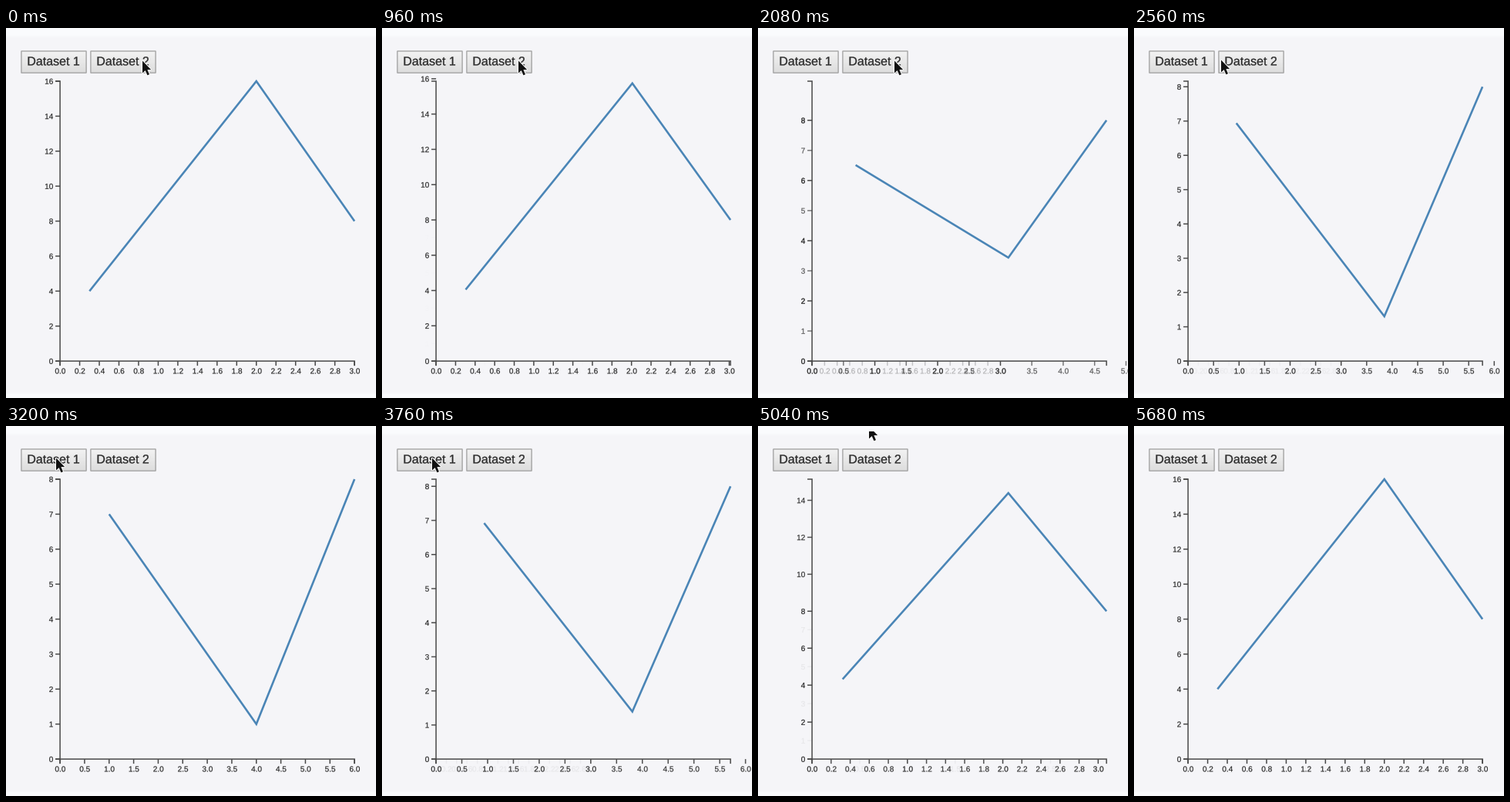
These frames come from a looping animation (480 by 480 pixels, 6.08 s). A matplotlib script:

```python
import numpy as np
import matplotlib.pyplot as plt
from matplotlib.animation import FuncAnimation
from matplotlib.patches import PathPatch, Polygon, Rectangle
from matplotlib.textpath import TextPath
from matplotlib.transforms import Affine2D

SIZE, STEP, LOOP = 480, 80, 6080
LEFT, RIGHT, TOP, BOTTOM = 70.1, 452.1, 69, 432.1
INK = "#2a2a2a"
RULE = dict(color="#484848", lw=1.5, zorder=2, solid_capstyle="butt",
            solid_joinstyle="miter", snap=False)

# Each dataset: points, axis maxima and tick steps
DATA = [
    dict(pts=[(0.3, 4), (2, 16), (3, 8)], xmax=3, ymax=16, dx=0.2, dy=2),
    dict(pts=[(1, 7), (4, 1), (6, 8)], xmax=6, ymax=8, dx=0.5, dy=1),
]
DURATION = 2440
TO_SECOND, TO_FIRST = 645, 3190

# Pointer path: time, x, y
POINTER = np.array([
    (0, 177, 42.5), (2320, 177, 42.5), (2560, 113, 41.5), (2880, 65, 41.5),
    (3760, 65, 41.5), (4320, 69.3, 41.5), (4800, 70, 41.5), (4960, 92, 32),
    (5040, 144, 0.5),
])
ARROW = np.array([(0, 0), (0, 16), (3.7, 12.6), (6.4, 18.8), (9, 17.7),
                  (6.4, 11.6), (11.2, 11.6)])

fig = plt.figure(figsize=(SIZE / 72, SIZE / 72), dpi=72, facecolor="#f5f5f8")
ax = fig.add_axes([0, 0, 1, 1])
ax.set_xlim(0, SIZE)
ax.set_ylim(SIZE, 0)
ax.axis("off")


def x_pos(v, data):
    return LEFT + (RIGHT - LEFT) * v / data["xmax"]


def y_pos(v, data):
    return BOTTOM - (BOTTOM - TOP) * v / data["ymax"]


def mix(a, b, k):
    return a + (b - a) * k


def ease(u):
    u = min(max(u, 0), 1)
    return 4 * u**3 if u < 0.5 else 1 - 4 * (1 - u)**3


def text_path(text, size):
    return TextPath((0, 0), text, size=size, prop={"family": "Liberation Sans"})


def place(patch, x, y):
    patch.set_transform(Affine2D().scale(1, -1).translate(x, y) + ax.transData)


def box(x, y, w, h, **style):
    return ax.add_patch(Rectangle((x, y), w, h, **style))


class Tick:
    """A tick mark and label that slides between both scales."""

    def __init__(self, value, text, horizontal, shared, owner):
        self.horizontal, self.shared, self.owner = horizontal, shared, owner
        scale = x_pos if horizontal else y_pos
        self.ends = [scale(value, d) for d in DATA]
        self.width = 10 * sum(0.278 if c == "." else 0.556 for c in text)
        self.mark, = ax.plot([], [], **RULE)
        self.label = ax.add_patch(PathPatch(text_path(text, 10), fc=INK,
                                            ec=INK, lw=0, zorder=2, snap=False))
        for part in (self.mark, self.label):
            part.set_clip_path(view)

    def update(self, k):
        pos = mix(*self.ends, k)
        if self.horizontal:
            self.mark.set_data([pos, pos], [BOTTOM, BOTTOM + 6])
            place(self.label, pos + 0.3 - self.width / 2, BOTTOM + 16.3)
        else:
            self.mark.set_data([LEFT - 6, LEFT], [pos, pos])
            place(self.label, LEFT - 8.8 - self.width, pos + 3.7)
        alpha = 1 if self.shared else (1 - k if self.owner == 0 else k)
        self.mark.set_alpha(alpha)
        self.label.set_alpha(alpha)
        # Common labels look heavier while the others fade
        weight = 4 * k * (1 - k) if self.shared else 0
        self.label.set_linewidth(0.2 + 0.2 * weight)


def make_ticks(horizontal):
    top, step = ("xmax", "dx") if horizontal else ("ymax", "dy")
    form = "{:.1f}" if horizontal else "{:.0f}"
    sets = [{form.format(i * d[step]) for i in range(round(d[top] / d[step]) + 1)}
            for d in DATA]
    return [Tick(float(s), s, horizontal, s in sets[0] & sets[1],
                 0 if s in sets[0] else 1)
            for s in sorted(sets[0] | sets[1], key=float)]


def make_button(x, text):
    ramp = np.linspace(0.955, 0.865, 32)[:, None, None] * np.ones((1, 1, 3))
    ax.imshow(ramp, extent=(x, x + 84.2, 58.2, 30), aspect="auto", zorder=4)
    box(x, 30, 84.2, 28.2, fc="none", ec="#a6a6a6", lw=1.4, zorder=5, snap=False)
    path = text_path(text, 16)
    label = ax.add_patch(PathPatch(path, fc=INK, ec=INK, lw=0.3, zorder=6,
                                   snap=False))
    ext = path.get_extents()
    place(label, x + 41.9 - (ext.x0 + ext.x1) / 2, 48.4)


# Lighter bands along the top and bottom edges
box(0, 0, SIZE, 10, fc="#fafbfd", lw=0, zorder=0)
box(0, 10, SIZE, 2, fc="#f7f8fa", lw=0, zorder=0)
box(0, 473, SIZE, 2, fc="#f7f8fa", lw=0, zorder=0)
box(0, 475, SIZE, 5, fc="#fafbfd", lw=0, zorder=0)

view = box(20, 57, SIZE - 20, SIZE - 57, fc="none", lw=0)
ticks = make_ticks(True) + make_ticks(False)
ax.plot([LEFT - 6, LEFT, LEFT, LEFT - 6], [TOP, TOP, BOTTOM, BOTTOM], **RULE)
ax.plot([LEFT, LEFT, RIGHT, RIGHT], [BOTTOM + 6, BOTTOM, BOTTOM, BOTTOM + 6],
        **RULE)

shapes = [np.array([(x_pos(x, d), y_pos(y, d)) for x, y in d["pts"]])
          for d in DATA]
curve, = ax.plot([], [], color="#4a85b6", lw=2.6, zorder=3, snap=False,
                 solid_joinstyle="miter", solid_capstyle="butt")

make_button(19.9, "Dataset 1")
make_button(109.9, "Dataset 2")

screen = box(0, 7, SIZE, SIZE - 7, fc="none", lw=0)
halo = ax.add_patch(Polygon(ARROW, fc="white", ec="white", lw=2, zorder=8))
arrow = ax.add_patch(Polygon(ARROW, fc="#111111", lw=0, zorder=9))
for part in (halo, arrow):
    part.set_clip_path(screen)

# Restore limits after the button gradients
ax.set_xlim(0, SIZE)
ax.set_ylim(SIZE, 0)


def draw(i):
    t = i * STEP
    k = ease((t - TO_SECOND) / DURATION) - ease((t - TO_FIRST) / DURATION)
    for tick in ticks:
        tick.update(k)
    curve.set_data(*mix(*shapes, k).T)

    tip = [np.interp(t, POINTER[:, 0], POINTER[:, j]) for j in (1, 2)]
    # The pointer leaves through the top and is back when the loop restarts
    for part in (halo, arrow):
        part.set_xy(ARROW + tip)
        part.set_visible(t <= POINTER[-1, 0])
    return []


anim = FuncAnimation(fig, draw, frames=LOOP // STEP, interval=STEP,
                     init_func=lambda: draw(0), repeat=True, repeat_delay=0)
plt.show()
```
